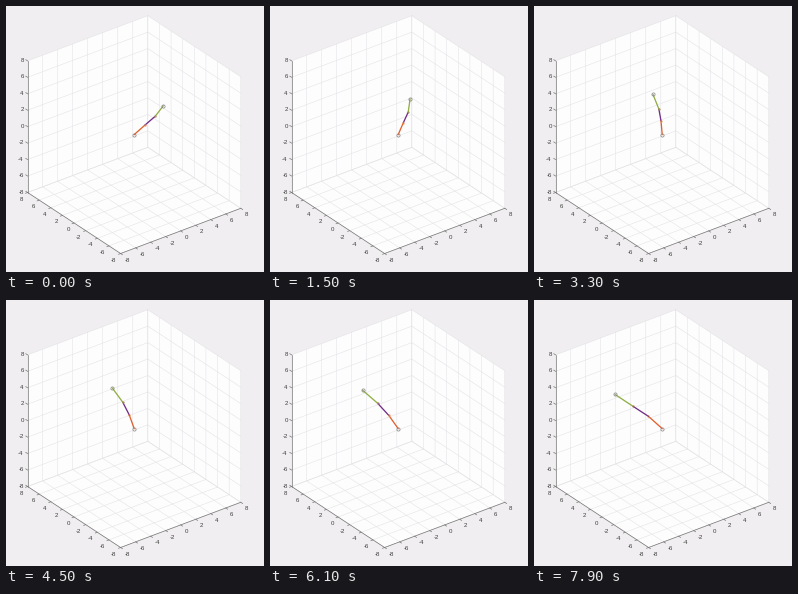
A matplotlib script for the animation above (8000 ms loop, 258x266 px).

```python
import numpy as np
import matplotlib.pyplot as plt
from matplotlib.animation import FuncAnimation

W, H, DPI = 258, 266, 100
FRAMES, STEP_MS = 80, 100
PX = 72 / DPI

BACKDROP, WALL = "#f0eef0", "#fefdfe"
GRID, AXIS, TEXT = "#e4e3e5", "#777777", "#404040"
LINKS = ["#e0602c", "#702c86", "#8fae45"]
JOINTS = ["#e8904c", "#a8804c"]

# Projected box: one corner and the screen direction of each full edge
FRONT = np.array([114.6, 247.5])
EX = np.array([120.2, -45.2])
EY = np.array([-93.0, -61.0])
EZ = np.array([0.0, -131.6])

HOLDS = (4, 7, 12, 20)  # frames on which the arm stands still
KEY_STEPS = (0, 18, 41, 75)
KEY_POSES = [  # elbow, wrist, tip
    [(138.7, 119.3), (149.2, 110.3), (157.3, 99.8)],
    [(131.0, 115.8), (133.2, 104.7), (132.2, 90.7)],
    [(123.2, 114.8), (116.8, 102.3), (106.4, 88.1)],
    [(114.4, 116.3), (99.0, 106.3), (81.1, 94.5)],
]

fig = plt.figure(figsize=(W / DPI, H / DPI), dpi=DPI, facecolor=BACKDROP)
ax = fig.add_axes([0, 0, 1, 1])
ax.set_xlim(0, W)
ax.set_ylim(H, 0)
ax.axis("off")


def point(x, y, z):
    """Screen position for box coordinates in 0..1."""
    return FRONT + x * EX + y * EY + z * EZ


def line(a, b, color, width, **kw):
    return ax.plot([a[0], b[0]], [a[1], b[1]], color=color, lw=width * PX, **kw)[0]


def ring(color, size, width):
    return ax.plot([], [], "o", ms=size * PX, mfc="none", mec=color,
                   mew=width * PX, snap=False)[0]


def wall(*corners):
    ax.fill(*np.array([point(*c) for c in corners]).T, color=WALL, lw=0)


def tick(pos, out, label, shift, align):
    line(pos, pos + 2.2 * out / np.hypot(*out), AXIS, 0.7)
    ax.text(*(pos + shift), label, fontsize=6.1 * PX, family="Liberation Sans",
            color=TEXT, ha=align, va="center_baseline")


def draw_box():
    wall((0, 0, 0), (1, 0, 0), (1, 1, 0), (0, 1, 0))
    wall((0, 1, 0), (1, 1, 0), (1, 1, 1), (0, 1, 1))
    wall((1, 0, 0), (1, 1, 0), (1, 1, 1), (1, 0, 1))
    marks = np.linspace(0, 1, 9)
    for u in marks:
        for a, b in [((u, 0, 0), (u, 1, 0)), ((0, u, 0), (1, u, 0)),
                     ((u, 1, 0), (u, 1, 1)), ((0, 1, u), (1, 1, u)),
                     ((1, u, 0), (1, u, 1)), ((1, 0, u), (1, 1, u))]:
            line(point(*a), point(*b), GRID, 0.55, snap=False)
    corner = point(0, 1, 0)
    line(FRONT, FRONT + EX, AXIS, 0.7)
    line(FRONT, corner, AXIS, 0.7)
    line(corner, corner + EZ, AXIS, 0.7)
    for i, u in enumerate(marks):
        label = str(2 * i - 8)
        tick(point(u, 0, 0), -EY, label, (4.0, 6.1), "left")
        tick(point(0, u, 0), -EX, label, (-4.2, 6.1), "right")
        tick(point(0, 1, u), EY, label, (-3.9, -1.0), "right")


def arm(frame):
    """Base, elbow, wrist and tip on smooth cubic paths through the key poses."""
    step = frame - sum(frame >= h for h in HOLDS)
    pose = paths @ step ** np.arange(3, -1, -1.0)
    return np.vstack([base, pose.reshape(3, 2)])


base = point(0.5, 0.5, 0.5)
paths = np.polyfit(KEY_STEPS, np.reshape(KEY_POSES, (4, 6)), 3).T

draw_box()
links = [line(base, base, c, 1.3, solid_capstyle="round", snap=False) for c in LINKS]
dots = [ring(c, 1.7, 0.5) for c in JOINTS]
ends = ring("#858585", 3.2, 0.7)


def update(frame):
    p = arm(frame)
    for i, link in enumerate(links):
        link.set_data(p[i:i + 2].T)
    for dot, q in zip(dots, p[1:3]):
        dot.set_data(q[:, None])
    ends.set_data(p[[0, 3]].T)
    return [*links, *dots, ends]


anim = FuncAnimation(fig, update, frames=FRAMES, interval=STEP_MS,
                     repeat=True, repeat_delay=0, blit=False)
plt.show()
```
